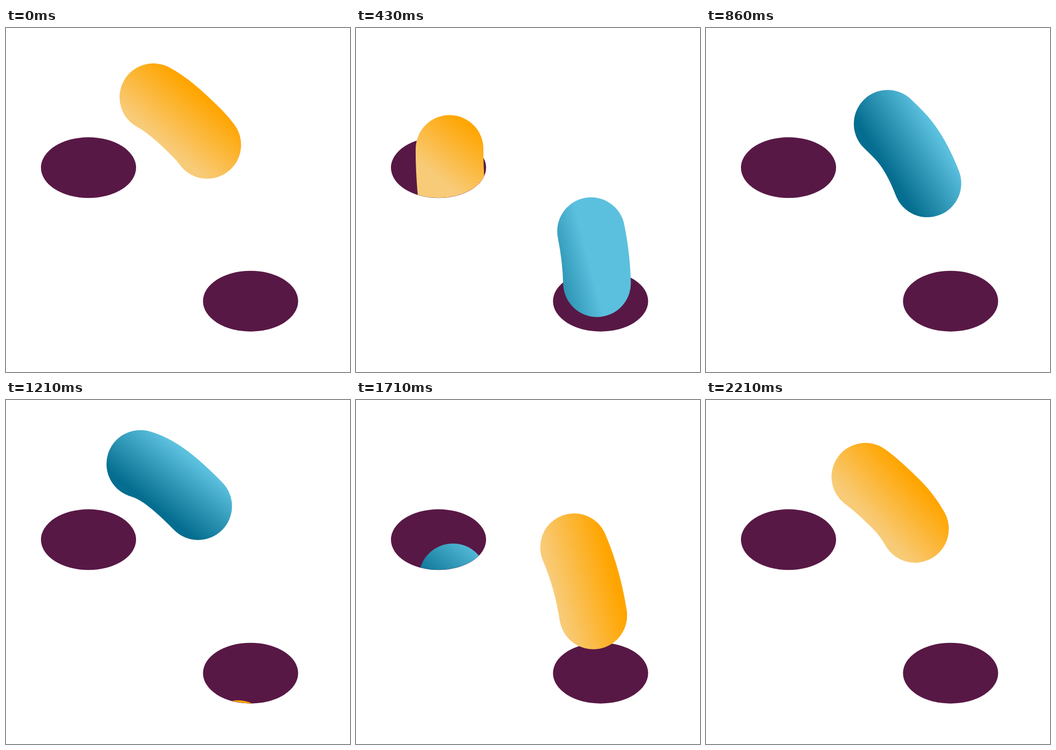
Write an HTML page that moves like this. It is 640x640 px and loops after 2.28 s.

```html
<!DOCTYPE html>
<html lang="en">
<head>
<meta charset="utf-8">
<title>Beans</title>
<style>
  html, body { margin: 0; width: 100%; height: 100%; overflow: hidden; background: #fff; }
  svg { display: block; width: 100%; height: 100%; }
  .bean { fill: none; stroke-width: 126; stroke-linecap: round; stroke-linejoin: round; }
</style>
</head>
<body>
<svg viewBox="0 0 640 640">
  <defs>
    <clipPath id="openings">
      <rect x="0" y="0" width="300" height="260"/>
      <rect x="300" y="0" width="340" height="508"/>
      <ellipse cx="153.5" cy="259.8" rx="88.5" ry="56.2"/>
      <ellipse cx="455" cy="508.2" rx="88.5" ry="56.2"/>
    </clipPath>
    <linearGradient id="orangeFill" gradientUnits="userSpaceOnUse">
      <stop offset="0" stop-color="#f8cb78"/>
      <stop offset="1" stop-color="#ffa500"/>
    </linearGradient>
    <linearGradient id="blueFill" gradientUnits="userSpaceOnUse">
      <stop offset="0" stop-color="#056d8f"/>
      <stop offset="1" stop-color="#5bc0de"/>
    </linearGradient>
  </defs>
  <g fill="#581845">
    <ellipse cx="153.5" cy="259.8" rx="88.5" ry="56.5"/>
    <ellipse cx="455" cy="508.2" rx="88.5" ry="56.5"/>
  </g>
  <g clip-path="url(#openings)">
    <path class="bean" id="orange" stroke="url(#orangeFill)"/>
    <path class="bean" id="blue" stroke="url(#blueFill)"/>
  </g>
</svg>
<script>
const LOOP = 2280;
const STEPS = 70;        // animation steps per full cycle
const RUN_UP = 110.8;    // hidden straight part before distance 0
const APEX = 417.5;      // distance of the tail at step 0, where the dive begins
const SHADE_HALF = 57;   // half the length of the colour gradient

const ROUTE = `M412 729 L432 620 C443 560 448.5 525 448.5 485
  C448.5 385 414 254.8 358 198 C316 155.4 283.6 128.4 250 119
  C228.9 113.1 216.2 115 201 128 C182.8 143.6 174 199 174 229
  C174 268 178 318 183 351 L204 500`;

const byId = id => document.getElementById(id);
const clamp01 = u => Math.min(1, Math.max(0, u));
const smooth = u => u * u * (3 - 2 * u);

// Steady launch, slowing glide, then a steady dive
const glide = step => APEX + 5.6 * step - 0.25 * step * step;
function tailAt(step) {
  if (step > 0) return APEX + 26.3 * step;
  if (step > -21) return glide(step);
  return glide(-21) + 21.5 * (step + 21);
}

const growth = step => smooth(clamp01((step + 25) / 7));
const lengthAt = step => Math.min(88 + 46.5 * growth(step), 141 - 3.9 * step);

function shade(name, step) {
  const bean = byId(name);
  const anchor = step > 0 ? APEX + 67 + 20.5 * step : tailAt(step) + 67;
  const { x, y } = bean.getPointAtLength(RUN_UP + anchor);
  const angle = (15 + 37 * clamp01((step + 19) / 20)) * Math.PI / 180;
  const shift = 90 * (growth(step) - 1);
  const fill = byId(name + 'Fill');
  [shift - SHADE_HALF, shift + SHADE_HALF].forEach((reach, i) => {
    fill.setAttribute('x' + (i + 1), x + reach * Math.cos(angle));
    fill.setAttribute('y' + (i + 1), y - reach * Math.sin(angle));
  });
}

function drawBean(name, step) {
  const bean = byId(name);
  bean.setAttribute('stroke-dasharray', `${lengthAt(step)} 5000`);
  bean.setAttribute('stroke-dashoffset', -Math.max(0, RUN_UP + tailAt(step)));
  shade(name, step);
}

function render(ms) {
  // 14 pictures per second, each showing the latest of 30 steps per second
  const picture = Math.ceil((Math.floor((ms % LOOP) / 10) + 0.5) * 0.14) - 1;
  const step = Math.floor(picture * 15 / 7);
  drawBean('orange', step < STEPS / 2 ? step : step - STEPS);
  drawBean('blue', step - STEPS / 2);
}

['orange', 'blue'].forEach(name => byId(name).setAttribute('d', ROUTE));

function tick() {
  render(performance.now());
  requestAnimationFrame(tick);
}
tick();
</script>
</body>
</html>
```
